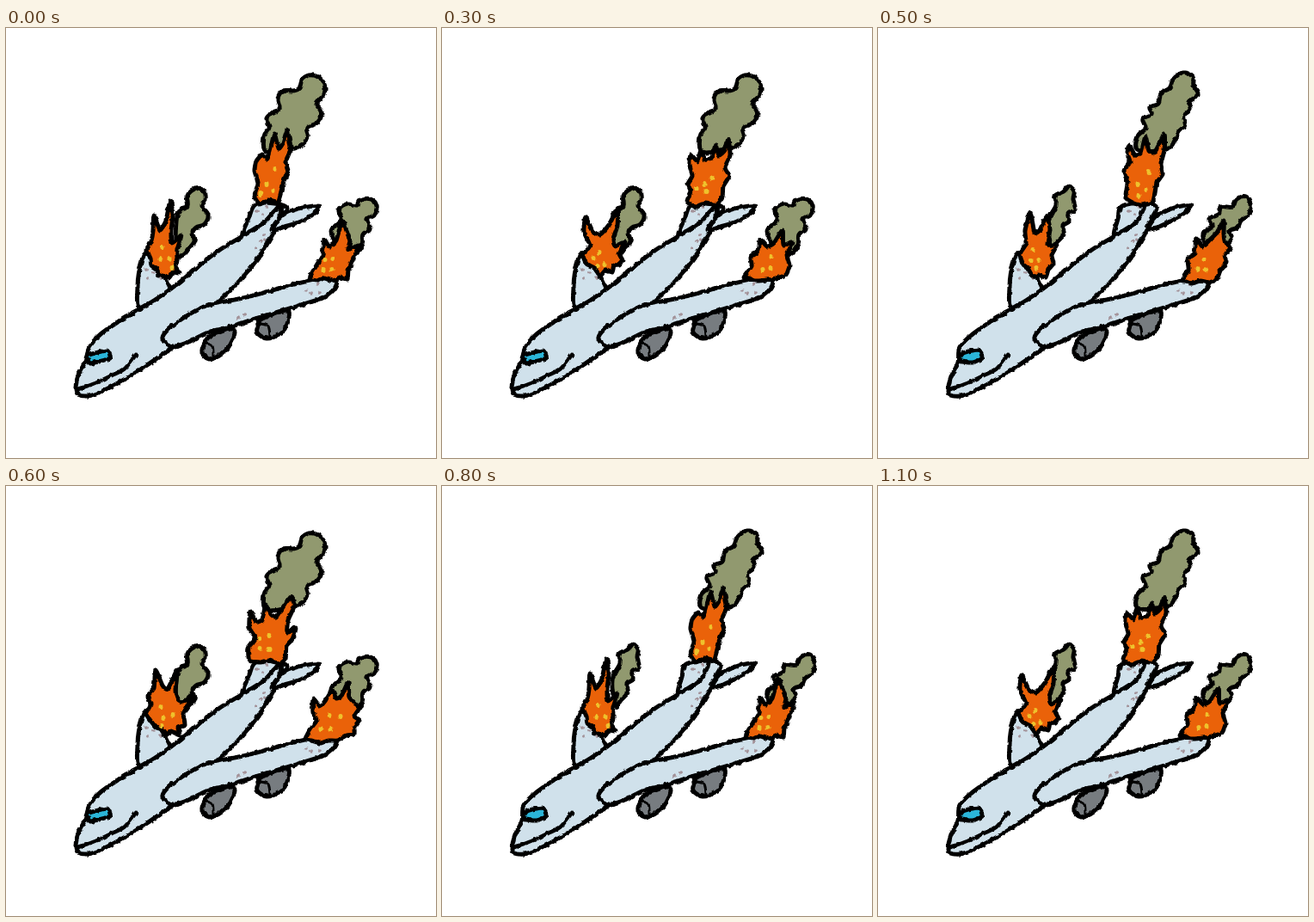
Recreate the animation shown at these times as an HTML page. Size 500 by 500 pixels, loop 1200 ms.

```html
<!DOCTYPE html>
<html lang="en">
<head>
<meta charset="utf-8">
<title>Burning plane</title>
<style>
  html, body { margin: 0; width: 100%; height: 100%; overflow: hidden; background: #fff; }
  svg { display: block; width: 100vw; height: 100vh; }
  path { stroke: #000; stroke-width: 5; stroke-linejoin: round; stroke-linecap: round; }
</style>
</head>
<body>
<svg id="stage" viewBox="0 0 500 500">
  <filter id="rough" filterUnits="userSpaceOnUse" x="0" y="0" width="500" height="500" color-interpolation-filters="sRGB">
    <feTurbulence type="fractalNoise" baseFrequency="0.16" numOctaves="2" seed="4" result="noise"/>
    <feDisplacementMap in="SourceGraphic" in2="noise" scale="4" xChannelSelector="R" yChannelSelector="G"/>
  </filter>
  <g id="art" filter="url(#rough)"></g>
</svg>
<script>
const STEP = 100;
const BODY = '#d0e1eb', SMOKE = '#91996f', FIRE = '#ea6209',
      SPARK = '#efc22c', METAL = '#777c80', GLASS = '#2bb5d8', SOOT = '#a39299';
const art = document.getElementById('art');

function add(parent, tag, attrs = {}) {
  const el = document.createElementNS('http://www.w3.org/2000/svg', tag);
  for (const key in attrs) el.setAttribute(key, attrs[key]);
  return parent.appendChild(el);
}

const points = text => text.trim().split(/\s+/).map(p => p.split(',').map(Number));

// Smooth line through the points; a lower bend keeps the corners sharper.
function curve(text, closed, bend) {
  const p = points(text), n = p.length;
  const at = i => closed ? p[(i + n) % n] : p[Math.max(0, Math.min(n - 1, i))];
  let d = 'M' + p[0];
  for (let i = 0; i < (closed ? n : n - 1); i++) {
    const [a, b, c, e] = [at(i - 1), at(i), at(i + 1), at(i + 2)];
    const c1 = [0, 1].map(k => b[k] + (c[k] - a[k]) * bend);
    const c2 = [0, 1].map(k => c[k] - (e[k] - b[k]) * bend);
    d += `C${c1} ${c2} ${c}`;
  }
  return d + (closed ? 'Z' : '');
}

const shape = (g, text, fill, bend = 0.16) => add(g, 'path', { d: curve(text, true, bend), fill });
const line = (g, text, width = 5) =>
  add(g, 'path', { d: curve(text, false, 0.16), fill: 'none', style: `stroke-width:${width}` });
const dots = (g, text, fill, rx, ry) =>
  points(text).forEach(([cx, cy]) => add(g, 'ellipse', { cx, cy, rx, ry, fill }));

// Parts shared by every plane pose
const frontWing = `182,362 187,352 205,338 230,324 250,319 280,313 310,305 335,298 358,293 372,290
  384,293 382,303 370,313 350,320 320,329 290,338 262,347 235,354 210,366 193,370`;
const backWing = '154,324 153,302 155,282 161,263 172,264 181,284 188,296 190,306 172,322';
const back = `110,356 130,342 150,330 175,315 200,297 225,276 250,257 275,242 300,226`;
const belly = `310,240 297,262 281,283 263,303 245,320 236,330 215,350 196,366
  193,372 180,381 155,398 130,413 108,424 95,428`;
const engines = [
  '238,358 264,350 263,364 251,379 236,385 228,377 231,366',
  '298,338 327,328 327,344 318,356 303,361 292,354 294,344'
];
const soot = `163,281 171,284 165,290 180,291 292,213 303,208 298,217 300,240 290,256 301,247 296,248
  349,305 355,308 365,307 362,298 270,337 278,334`;

const poses = [
  {
    nose: '84,426 81,419 84,404 92,388 97,371',
    tail: '312,213 319,207 318,224',
    fin: '275,242 282,222 290,205 312,204 327,210 312,224 295,236',
    stabilizer: '309,235 318,221 328,214 345,209 363,207 359,215 342,225 324,231',
    glass: '95,381 117,375 121,384 98,390',
    smoke: [
      `303,144 300,126 306,116 303,105 311,98 318,94 316,82 322,73 334,73 341,70 345,59 357,55 369,63
       370,77 361,88 367,98 362,110 350,116 351,127 342,137 328,142`,
      `198,225 203,211 211,207 211,195 220,187 230,189 232,200 228,207 235,217 231,228 221,232 217,238
       219,248 213,256 206,264 198,262`,
      `385,254 378,237 385,228 390,222 387,212 397,205 408,207 412,200 424,199 431,207 428,218 420,222
       423,234 415,240 414,252 405,263 392,264`
    ]
  },
  {
    nose: '83,427 81,421 86,404 93,388 95,371',
    tail: '308,213 312,203 324,209 316,225',
    fin: '275,242 279,222 284,207 312,203 320,208 312,224 295,236',
    stabilizer: '314,234 321,222 328,216 345,209 363,206 359,213 343,223 327,231',
    glass: '94,386 103,378 115,376 118,383 109,388 98,389',
    smoke: [
      `303,150 298,131 306,121 303,110 312,105 319,98 318,89 330,84 334,70 345,65 350,60 362,57 371,64
       370,78 366,91 368,100 357,105 358,115 347,121 347,130 336,140`,
      `200,232 209,219 204,210 210,202 211,193 223,188 236,194 236,206 230,213 230,223 221,228 222,238
       216,248 209,257`,
      `381,254 376,239 388,230 386,221 396,217 398,208 409,207 416,200 428,202 432,212 424,222 425,230
       417,235 416,246 406,258`
    ]
  },
  {
    nose: '84,427 81,422 85,406 93,389 95,371',
    tail: '308,213 312,203 324,209 316,225',
    fin: '275,242 279,222 284,207 312,203 320,208 312,224 295,236',
    stabilizer: '314,234 321,222 328,216 345,209 363,206 359,213 343,223 327,231',
    glass: '94,387 99,378 117,374 121,384 110,389',
    smoke: [
      `303,142 302,126 311,117 308,106 318,100 316,92 326,88 329,76 339,70 343,60 355,52 366,57 367,67
       372,77 362,86 363,95 356,102 357,113 350,120 346,129 335,141`,
      `198,226 207,206 206,195 216,190 222,184 228,190 227,199 229,211 221,216 222,225 215,230 216,240
       208,249 202,255`,
      `384,254 378,240 388,231 385,222 396,216 399,208 412,208 417,199 428,196 433,205 431,217 422,224
       418,232 408,236 411,243 404,253`
    ]
  }
];

// Each blaze: tail, left wing and right wing flames, then the sparks in them
const blazeA = {
  flames: [
    `289,166 291,155 298,147 304,152 308,139 312,123 317,140 322,134 327,119 331,140 325,156 328,166
     323,178 320,190 316,202 305,200 295,205 289,196 293,180`,
    `168,268 164,258 169,247 171,236 172,218 179,235 186,224 191,200 194,218 192,236 193,250 204,241
     199,258 199,270 197,278 201,285 194,284 190,290 182,287 177,289 176,281 169,276`,
    `353,291 361,276 368,264 370,246 376,254 384,247 391,223 396,236 400,248 398,258 410,252 404,268
     398,282 397,292 388,290 380,294 370,291 362,294`
  ],
  sparks: '313,164 303,181 296,193 310,189 182,255 180,268 190,268 193,279 380,268 369,281 379,281 371,270'
};
const blazeB = {
  flames: [
    `286,166 293,156 290,146 292,136 299,148 306,145 311,126 315,143 322,144 333,124 333,142 329,158
     331,170 324,180 322,192 319,203 306,206 296,203 288,197 290,180`,
    `165,263 172,251 171,236 177,214 182,238 188,235 196,219 200,234 197,252 208,252 202,264 204,274
     198,281 195,290 187,287 180,289 174,279 169,275`,
    `353,294 361,281 360,268 368,262 370,244 377,254 386,246 394,238 402,224 402,240 404,250 410,255
     403,265 405,272 398,282 394,292 385,296 375,294 365,297 358,295`
  ],
  sparks: '315,167 302,181 311,188 303,195 180,258 187,270 178,270 184,279 379,269 372,280 381,281'
};
const blazeC = {
  flames: [
    `282,188 290,177 283,165 284,146 291,158 298,155 302,138 308,149 314,152 322,141 332,128 335,140
     328,156 327,170 337,165 333,178 326,186 325,200 318,206 306,203 296,205 283,203`,
    `163,265 168,254 165,244 172,235 174,214 182,232 188,236 199,214 197,238 200,248 206,251 216,243
     211,256 206,265 208,278 200,281 202,290 192,285 188,289 182,283 175,281 169,274`,
    `348,294 355,281 361,273 357,262 357,247 365,256 371,250 379,237 384,247 390,244 398,228 399,245
     405,252 411,258 405,268 411,272 405,280 405,289 396,290 385,296 375,296 365,299 355,296`
  ],
  sparks: '306,174 295,189 306,190 295,178 180,257 194,266 183,270 181,279 376,266 378,283 366,282 389,268'
};
const blazeD = {
  flames: [
    `286,181 291,172 288,160 289,147 297,155 301,142 306,153 314,150 318,136 322,148 329,142 333,129
     335,148 329,162 334,172 327,184 326,196 319,205 306,204 295,208 285,202 289,190`,
    `164,264 172,253 165,237 167,219 175,236 184,240 194,229 204,211 204,230 199,245 201,253 213,249
     206,262 210,270 206,275 200,276 198,284 190,282 184,288 177,279 168,274`,
    `351,290 360,277 359,266 368,259 370,246 378,254 386,250 396,235 397,252 408,249 401,264 404,276
     400,287 388,291 378,293 365,294 357,291`
  ],
  sparks: '314,174 305,181 296,187 307,190 183,261 181,277 189,275 176,267 383,266 382,279 373,281'
};

function drawPlane(pose) {
  const g = add(art, 'g');
  pose.smoke.forEach(s => shape(g, s, SMOKE, 0.19));
  shape(g, backWing, BODY);
  shape(g, pose.fin, BODY);
  shape(g, [pose.nose, back, pose.tail, belly].join(' '), BODY);
  shape(g, pose.stabilizer, BODY);
  engines.forEach(e => shape(g, e, METAL));
  line(g, '232,367 240,370 241,382', 3);
  line(g, '296,344 305,347 307,359', 3);
  shape(g, frontWing, BODY);
  shape(g, pose.glass, GLASS, 0.08);
  line(g, '83,420 104,413 125,403 137,397 145,388 151,380', 4.5);
  dots(g, soot, SOOT, 2, 1.8);
  return g;
}

function drawBlaze(blaze) {
  const g = add(art, 'g');
  blaze.flames.forEach(f => shape(g, f, FIRE, 0.09));
  dots(g, blaze.sparks, SPARK, 2.5, 3);
  return g;
}

const planes = poses.map(drawPlane);
const fires = [blazeA, blazeB, blazeC, blazeD].map(drawBlaze);

function showOnly(groups, index) {
  groups.forEach((g, i) => g.setAttribute('display', i === index ? 'inline' : 'none'));
}

// Three plane poses and four blazes cycle side by side: twelve steps per loop.
const start = performance.now();
let shown = -1;
function tick() {
  const step = Math.floor((performance.now() - start) / STEP) % 12;
  if (step !== shown) {
    showOnly(planes, step % 3);
    showOnly(fires, step % 4);
    shown = step;
  }
  requestAnimationFrame(tick);
}
tick();
</script>
</body>
</html>
```
